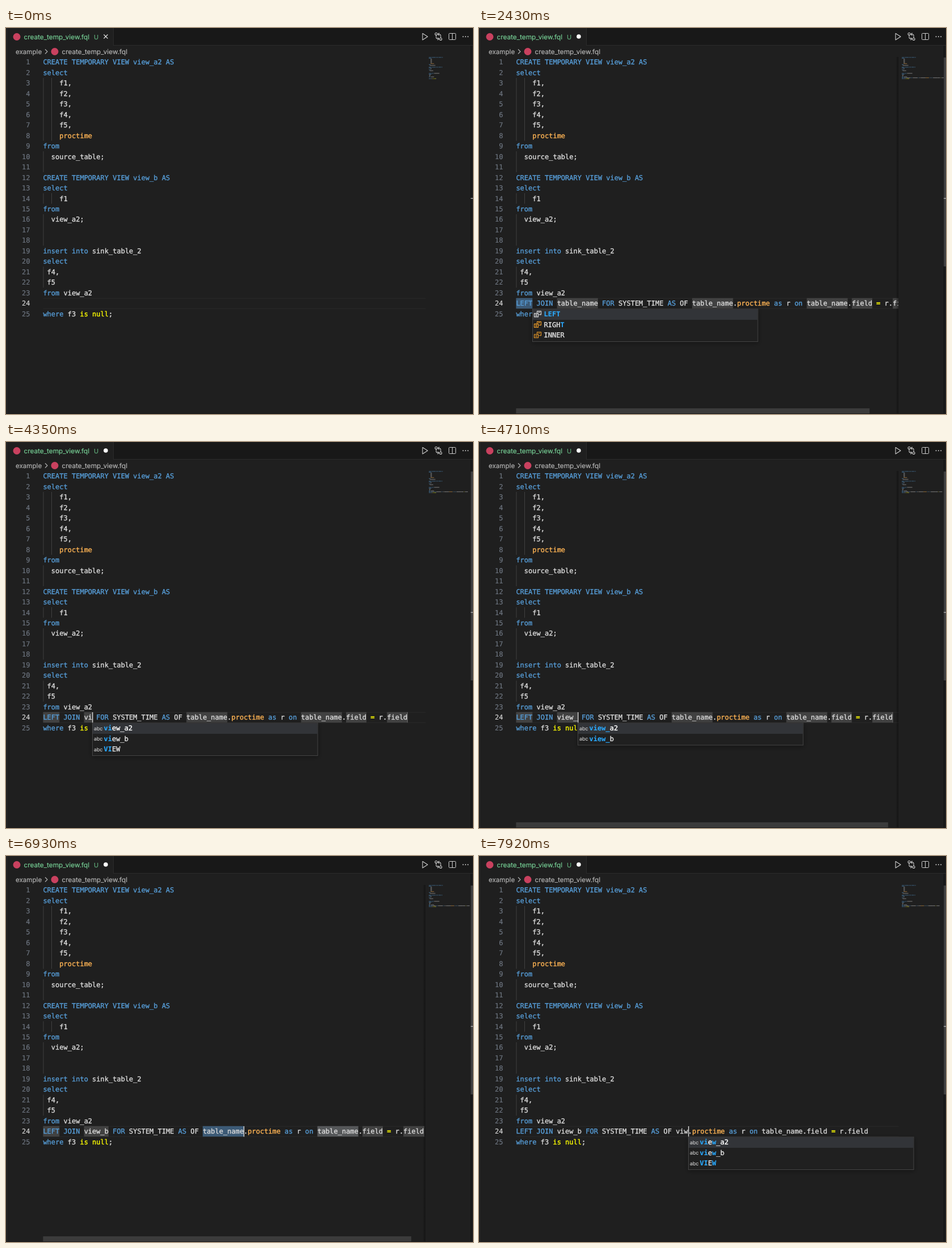
Recreate the animation shown at these times as an HTML page with a canvas. Size 824x680 px, loop 8 s.

```html
<!DOCTYPE html>
<html lang="en">
<head>
<meta charset="utf-8">
<title>SQL editor</title>
<style>
html, body { margin: 0; width: 100%; height: 100%; overflow: hidden; background: #1f1f1f; }
canvas { display: block; width: 824px; height: 680px; }
</style>
</head>
<body>
<canvas id="stage" width="824" height="680"></canvas>
<script>
const ctx = document.getElementById('stage').getContext('2d');
ctx.textRendering = 'geometricPrecision';
ctx.lineJoin = 'round';
const LOOP = 8000, BLINK = 450;
const X0 = 65.4, CW = 7.224, Y0 = 60.2, LH = 18.47, VIEW_W = 673.3;
const MONO = '12px "DejaVu Sans Mono", monospace';
const UI = 'Inter, sans-serif';
const BLUE = '#569cd6', WHITE = '#dadada', ORANGE = '#ffb454', YELLOW = '#ffff00', HIT = '#2aaaff';

const code = [
  'CREATE TEMPORARY VIEW view_a2 AS', 'select',
  '    f1,', '    f2,', '    f3,', '    f4,', '    f5,', '    proctime',
  'from', '  source_table;', '',
  'CREATE TEMPORARY VIEW view_b AS', 'select', '    f1', 'from', '  view_a2;', '', '',
  'insert into sink_table_2', 'select', ' f4,', ' f5', 'from view_a2', '',
  'where f3 is null;'
];
const ACTIVE = 23;
// guide x, first row, last row
const guides = [[66, 3, 8], [80.5, 3, 8], [66, 10, 11], [66, 14, 14], [80.5, 14, 14], [66, 16, 18], [66, 21, 22]];

const KEYWORD = /^(AS|as|select|from|insert|into|where|on|LEFT|JOIN|join|FOR)$/;
function tokens(line) {
  const all = line.startsWith('CREATE');
  return [...line.matchAll(/\w+|[^\w\s]+/g)].map(m => {
    const s = m[0];
    const color = all || KEYWORD.test(s) ? BLUE
      : s === 'proctime' ? ORANGE
      : /^(is|null|=)$/.test(s) ? YELLOW : WHITE;
    return { s, col: m.index, color };
  });
}

// Even parts are snippet fields, odd parts are plain text.
const typed = s => ['', s];
const snippet = (a, b) => ['LEFT', ' JOIN ', a, ' FOR SYSTEM_TIME AS OF ', b,
  '.proctime as r on ', 'table_name', '.', 'field', ' = r.', 'field'];

const item = (icon, label, hits, detail) => ({ icon, label, hits, detail });
const joinList = s => [item('word', 'join', s, 'Join')];
const sides = [item('enum', 'LEFT', 'LEFT'), item('enum', 'RIGHT', 'T'), item('enum', 'INNER', '')];
const views = s => ['view_a2', 'view_b', 'VIEW']
  .filter(v => new RegExp([...s].join('.*'), 'i').test(v))
  .map(v => item('abc', v, s));

const steps = [];
const step = (t, parts, at, more) => steps.push({ t, parts, at, base: t, fields: parts.length > 2, ...more });
// Typing: the list opens just after the first letter, then follows the caret.
function type(word, times, make, at, list, more) {
  times.forEach((t, i) => {
    const s = word.slice(0, i + 1), parts = make(s);
    step(t, parts, at, { pop: i ? list(s) : null, ...more });
    if (!i) step(t + 30, parts, at, { pop: list(s), ...more });
  });
}
const T = 'table_name', first = s => snippet(s, T), second = s => snippet('view_b', s);

step(0, typed(''), 1, { base: 480 });
type('join', [1170, 1320, 1470, 1620], typed, 1, joinList);
step(2010, first(T), 0, { base: 1980, sel: 0 });
step(2070, first(T), 0, { base: 1980, sel: 0, pop: sides });
step(2550, first(T), 2, { sel: 2 });
step(2610, first(T), 2, { base: 2550, sel: 2, same: true });
type('view_', [4230, 4320, 4410, 4500, 4710], first, 2, views);
step(4830, first('view_b'), 2, { pop: views('view_') });
step(4860, first('view_b'), 2, { base: 4830, pop: views('view_b') });
step(5520, first('view_b'), 2, { base: 4830 });
step(6780, second(T), 4, { base: 6930, sel: 4 });
step(6930, second(T), 4, { base: 6900, sel: 4, same: true });
type('viw', [7680, 7770, 7890], second, 4, views, { fields: false });

const rowY = n => Y0 + n * LH;
const colX = n => X0 + n * CW;
function rect(x, y, w, h, color) { ctx.fillStyle = color; ctx.fillRect(x, y, w, h); }
// A hairline outline gives the slightly heavy look of the editor's text.
function text(s, x, y, color, font = MONO, align = 'left', weight = 0.35) {
  ctx.font = font;
  ctx.textAlign = align;
  ctx.fillStyle = ctx.strokeStyle = color;
  ctx.fillText(s, x, y + 4.2);
  ctx.lineWidth = weight;
  ctx.strokeText(s, x, y + 4.2);
}
function disc(x, y, r, color) {
  ctx.fillStyle = color;
  ctx.beginPath();
  ctx.arc(x, y, r, 0, 7);
  ctx.fill();
}
function stroke(d, color, w = 1.1) {
  ctx.strokeStyle = color;
  ctx.lineWidth = w;
  ctx.stroke(new Path2D(d));
}

function header(dirty) {
  rect(0, 0, 824, 31, '#181818');
  rect(2, 0, 187, 31, '#1f1f1f');
  rect(189, 0, 1, 31, '#2b2b2b');
  rect(189, 30, 635, 1, '#2b2b2b');
  disc(19, 15.5, 6.5, '#c9415f');
  text('create_temp_view.fql', 31.5, 15.5, '#73c991', '11.8px ' + UI, 'left', 0.2);
  text('U', 155, 15.5, '#5fa878', '11px ' + UI, 'left', 0.2);
  if (dirty) disc(176, 15, 3.8, '#ffffff');
  else stroke('M172.500 11.500l7 7M179.500 11.500l-7 7', '#e8e8e8');

  const c = '#cccccc';
  stroke('M735 9.5v11.5l9-5.75z', c);
  stroke('M759 12.5v4q0 2.5 2.5 2.5h2M761.5 16.8l2.3 2.3-2.3 2.3M767 17.5v-4q0-2.5-2.5-2.5h-2M764.5 8.7l-2.3 2.3 2.3 2.3', c);
  stroke('M757 10.5a2 2 0 1 0 4 0a2 2 0 1 0-4 0M765 19.5a2 2 0 1 0 4 0a2 2 0 1 0-4 0', c);
  stroke('M782.5 9.5h10q1 0 1 1v9q0 1-1 1h-10q-1 0-1-1v-9q0-1 1-1zM787.5 9.5v11', c, 1);
  for (const x of [806.5, 810.8, 815.1]) disc(x, 15.2, 1, c);

  text('example', 17, 41.8, '#b0b0b0', '11.6px ' + UI, 'left', 0.2);
  stroke('M69 37.5l4 4-4 4', '#b0b0b0');
  disc(86, 41.5, 6.5, '#c9415f');
  text('create_temp_view.fql', 98.5, 41.8, '#b0b0b0', '11.8px ' + UI, 'left', 0.2);
}

function fieldMarks(s) {
  let col = 0;
  const y = rowY(ACTIVE) - 9.2;
  s.parts.forEach((p, i) => {
    if (i % 2 === 0 && p) {
      const color = i === s.sel ? '#3c5a76' : s.same && p === T ? '#555759' : '#414141';
      rect(colX(col), y, p.length * CW, 18.5, color);
    }
    col += p.length;
  });
  rect(colX(col) - 0.5, y, 1, 18.5, '#6a6a6a');
}

function minimap(lines) {
  ctx.globalAlpha = 0.5;
  lines.forEach((line, n) => {
    for (const k of tokens(line)) rect(746 + k.col * 0.775, 51.3 + n * 1.56, k.s.length * 0.775, 1, k.color);
  });
  ctx.globalAlpha = 1;
}

function itemIcon(kind, x, y, active) {
  if (kind === 'abc') return text('abc', x + 3, y - 0.5, '#d0d0d0', '9px ' + UI, 'left', 0.1);
  if (kind === 'word') {
    ctx.setLineDash([1.5, 1]);
    stroke(`M${x + 5} ${y - 5.5}h11v11h-11z`, '#ffffff');
    ctx.setLineDash([]);
    return;
  }
  const c = active ? '#e0e0e0' : '#ee9d28';
  stroke(`M${x + 8.5} ${y - 1}v-4h7v6h-4M${x + 3.5} ${y - 1}h7v6h-7zM${x + 5.5} ${y + 1}h3M${x + 5.5} ${y + 3}h3M${x + 10.5} ${y - 3}h3`, c);
}

function popup(items, x) {
  const top = 494.6, w = 398.5, h = items.length * LH + 3;
  ctx.save();
  ctx.shadowColor = 'rgba(0,0,0,.36)';
  ctx.shadowBlur = 8;
  ctx.shadowOffsetY = 2;
  rect(x, top, w, h, '#454545');
  ctx.restore();
  rect(x + 1, top + 1, w - 2, h - 2, '#202020');
  items.forEach((it, n) => {
    const y = rowY(ACTIVE + 1 + n) + 0.4;
    if (!n) rect(x + 1, top + 1, w - 2, LH, '#323438');
    itemIcon(it.icon, x, y, !n);
    let k = 0;
    [...it.label].forEach((ch, i) => {
      const hit = k < it.hits.length && ch.toLowerCase() === it.hits[k].toLowerCase();
      if (hit) k++;
      const font = (hit ? 'bold ' : '') + MONO;
      text(ch, x + 20.6 + i * CW, y, hit ? HIT : n ? '#e0e0e0' : '#ffffff', font, 'left', hit ? 0.1 : 0.4);
    });
    if (it.detail) text(it.detail, x + w - 10, y, '#cccccc', '10.4px "DejaVu Sans Mono", monospace', 'right', 0.1);
  });
}

function draw(t) {
  const s = steps.filter(p => p.t <= t).pop();
  const lines = code.slice();
  lines[ACTIVE] = s.parts.join('');
  const caretX = colX(s.parts.slice(0, s.at + 1).join('').length);
  const content = lines[ACTIVE].length * CW + 26;
  const wide = content > VIEW_W;

  rect(0, 0, 824, 680, '#1f1f1f');
  header(t >= 1170);

  const y = rowY(ACTIVE);
  rect(X0, y - 9.2, 675, 1, '#292929');
  rect(X0, y + 8.8, 675, 1, '#292929');
  for (const [x, a, b] of guides) rect(x - 0.5, rowY(a - 1) - LH / 2, 1, (b - a + 1) * LH, '#404040');

  ctx.save();
  ctx.beginPath();
  ctx.rect(0, 50, 740, 630);
  ctx.clip();
  if (s.fields) fieldMarks(s);
  lines.forEach((line, n) => {
    text(n + 1, 42.4, rowY(n), n === ACTIVE ? '#d4d4d4' : '#6e7681', MONO, 'right', 0.2);
    for (const k of tokens(line)) text(k.s, colX(k.col), rowY(n), k.color);
  });
  ctx.restore();

  if (wide) {
    const g = ctx.createLinearGradient(735, 0, 740, 0);
    g.addColorStop(0, 'rgba(0,0,0,0)');
    g.addColorStop(1, 'rgba(0,0,0,.35)');
    rect(735, 51, 5, 629, g);
    rect(X0, 670, VIEW_W * VIEW_W / content, 10, '#3b3b3b');
  }
  minimap(lines);

  rect(820, 31, 4, 649, '#1c1c1c');
  rect(820, 31, 1, 649, '#0d0e10');
  const fade = Math.min(1, Math.max(0, (t - 450) / 90));
  rect(820, 52, 4, 368, `rgba(121,121,121,${0.4 * fade})`);
  rect(820, 299.5, 4, 1.5, '#a0a0a0');
  rect(0, 0, 1, 680, '#181818');
  rect(1, 0, 1, 680, '#2b2b2b');
  rect(0, 679, 824, 1, '#181818');

  if (t >= s.base && Math.floor((t - s.base) / BLINK) % 2 === 0) rect(Math.round(caretX), y - 9, 1.5, 18.5, '#d0d0d0');
  if (s.pop) popup(s.pop, Math.round(caretX));
}

function frame() {
  draw(performance.now() % LOOP);
  requestAnimationFrame(frame);
}
frame();
</script>
</body>
</html>
```
